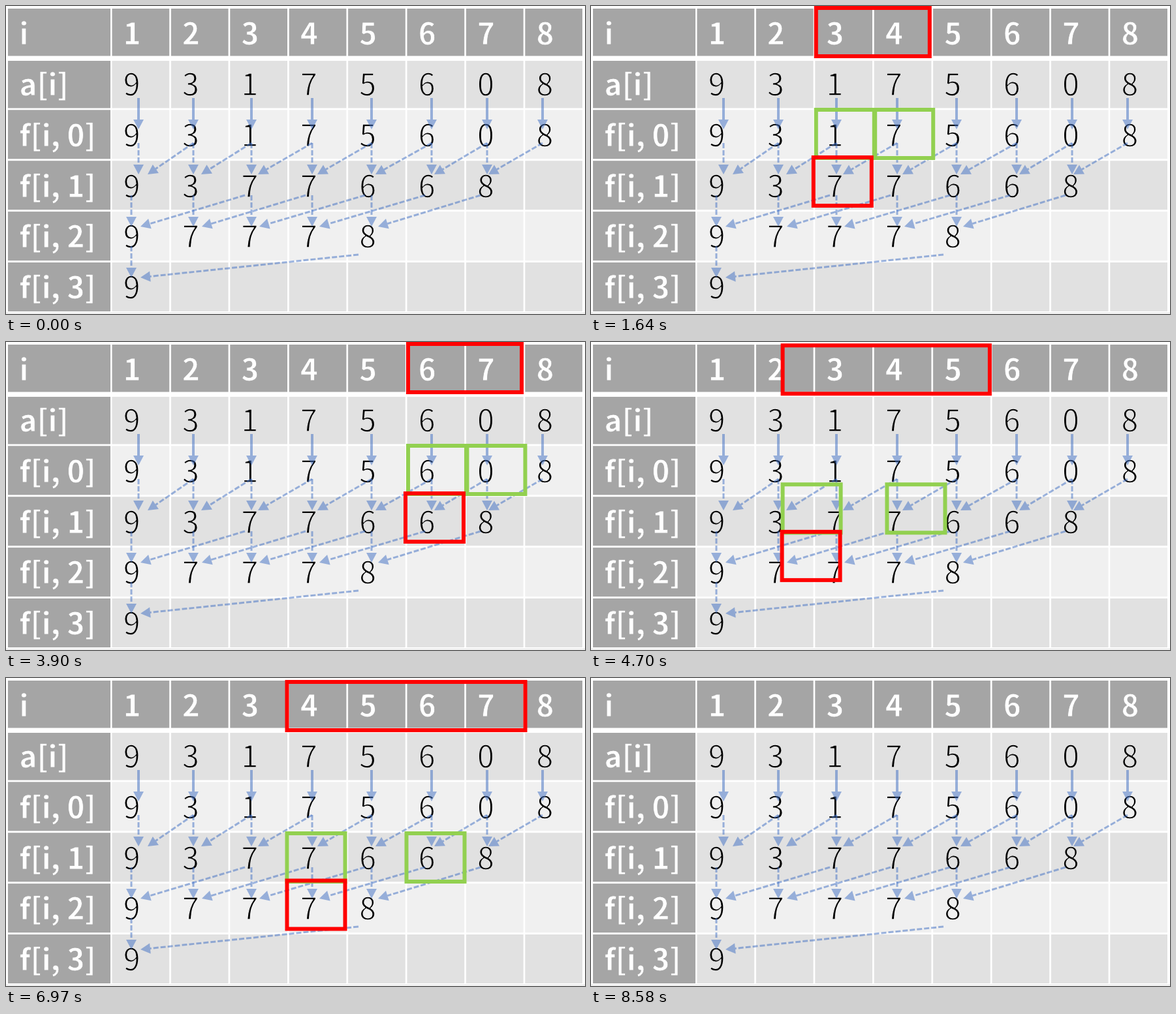
Recreate the animation shown at these times as an HTML page with a canvas. Size 887 by 472 pixels, loop 8680 ms.

```html
<!DOCTYPE html>
<html lang="en">
<head>
<meta charset="utf-8">
<title>Sparse table</title>
<style>
html, body { margin: 0; width: 100%; height: 100%; overflow: hidden; background: #fff; }
canvas { display: block; }
</style>
</head>
<body>
<canvas id="stage" width="887" height="472"></canvas>
<script>
const ctx = document.getElementById('stage').getContext('2d');
const LOOP = 8680;
const FAMILY = '"Noto Sans CJK SC", "Noto Sans CJK", "Noto Sans", sans-serif';
const COL = 90.4;
const GREY = '#a5a5a5', RED = '#f00', GREEN = '#92d050';

const input = [9, 3, 1, 7, 5, 6, 0, 8];
const anchors = [203, 287, 376, 469, 560, 652, 737, 822];

// Each level joins two neighbours that lie `span` apart
const levels = [
  { span: 1, x: 164, pitch: 90.4, width: 174, top: 3, inset: 4, first: 203, tail: 210, side: 210, tip: 258 },
  { span: 2, x: 156, pitch: 91.5, width: 365, top: 6, inset: 0, first: 192, tail: 290, side: 290, tip: 338 },
  { span: 4, x: 157, pitch: 91, width: 729, top: 3, inset: 0, first: 192, tail: 368, side: 381, tip: 416 }
];

function joinPairs(list, span) {
  return list.slice(span).map((v, i) => Math.max(v, list[i]));
}

// The table keeps f[i, 3] only, so the last level has one value
const results = [input];
levels.forEach((l, n) => results.push(joinPairs(results[n], l.span)));

const rows = [
  { label: 'i', values: input.map((v, i) => i + 1) },
  { label: 'a[i]', values: input },
  ...results.map((values, n) => ({ label: `f[i, ${n}]`, values }))
];

function write(g, text, x, y, color, back, thin) {
  g.fillStyle = color;
  g.fillText(text, x, y);
  g.strokeStyle = back;
  g.lineWidth = thin;
  g.strokeText(text, x, y);
}

function drawRow(g, row, r) {
  const top = r ? 3.5 + 77.9 * r + (r === 1 ? 2.6 : 0) : 4;
  const height = r > 1 ? 75 : 72.5;
  const base = r ? 59.5 + 77.7 * r : 59;
  const back = !r ? GREY : r % 2 ? '#e1e1e1' : '#f0f0f0';

  g.fillStyle = GREY;
  g.fillRect(3, top, 157, height);
  g.fillStyle = back;
  for (let c = 0; c < 8; c++) g.fillRect(162.5 + c * COL, top, 87.7, height);

  g.font = 'bold 45.5px ' + FAMILY;
  write(g, row.label, 20.5, base, '#fff', GREY, 0.8);
  if (r) g.font = '300 46.5px ' + FAMILY;
  row.values.forEach((v, c) => {
    write(g, v, 179.7 + c * COL, base, r ? '#000' : '#fff', back, r ? 1.3 : 0.8);
  });
}

function arrow(g, x1, y1, x2, y2, width, dash) {
  const neck = Math.hypot(x2 - x1, y2 - y1) - 15;
  g.save();
  g.translate(x1, y1);
  g.rotate(Math.atan2(y2 - y1, x2 - x1));
  g.strokeStyle = g.fillStyle = 'rgba(68, 114, 196, 0.52)';
  g.lineWidth = width;
  g.setLineDash(dash);
  g.beginPath();
  g.moveTo(0, 0);
  g.lineTo(neck, 0);
  g.stroke();
  g.beginPath();
  g.moveTo(neck + 15, 0);
  g.lineTo(neck, -8);
  g.lineTo(neck, 8);
  g.fill();
  g.restore();
}

function drawArrows(g, level, n) {
  const { span, first, tail, side, tip } = level;
  results[n + 1].forEach((v, c) => {
    const x = c ? anchors[c] : first;
    const reach = 14 - 2 * c / span;
    arrow(g, x, tail, x, tip, 3, [8, 3]);
    arrow(g, anchors[c + span] - 10 * n, side, x + reach, tip, 3, [8, 3]);
  });
}

function makeTable() {
  const layer = document.createElement('canvas');
  layer.width = 887;
  layer.height = 472;
  const g = layer.getContext('2d');
  g.lineJoin = 'round';
  g.fillStyle = '#fff';
  g.fillRect(0, 0, 887, 472);
  g.fillStyle = '#dcdcdc';
  g.fillRect(0, 470, 887, 1);
  rows.forEach((row, r) => drawRow(g, row, r));
  anchors.forEach(x => arrow(g, x, 141, x, 189, 4, []));
  levels.forEach((level, n) => drawArrows(g, level, n));
  return layer;
}

// Markers for one result cell: the covered range, both operands, the result
function poseOf(n, c) {
  const { span, x, pitch, width, top, inset } = levels[n];
  const left = x + pitch * c;
  const y = 159 + 79 * n;
  return {
    range: [left, top, width],
    a: [left, y, 89],
    b: [left + pitch * span, y, 89],
    result: [left - inset, 232 + 78.5 * n, 89]
  };
}

const stops = results.slice(1).flatMap((list, n) => list.map((v, c) => ({ n, pose: poseOf(n, c) })));
const glide = [0.19, 0.65, 0.89, 1];
const sweep = [0, 0.75, 0.96, 1];
const startOf = i => Math.max(720, 586 + 664 * i);

function mix(from, to, p) {
  const pose = {};
  for (const part in from) pose[part] = from[part].map((v, k) => v + (to[part][k] - v) * p);
  return pose;
}

function poseAt(t) {
  let i = 0;
  while (i < stops.length - 2 && t >= startOf(i + 1)) i++;
  if (t < startOf(0)) return stops[0].pose;
  const step = Math.min(3, Math.floor((t - startOf(i)) / 126.6));
  const from = stops[i], to = stops[i + 1];
  const ease = from.n === to.n ? glide : sweep;
  return mix(from.pose, to.pose, ease[step]);
}

function opacityAt(t) {
  if (t < 210 || t >= 8580) return 0;
  return t < 310 || t >= 8480 ? 0.5 : 1;
}

function box([x, y, w], color) {
  ctx.strokeStyle = color;
  ctx.strokeRect(x, y, w, 74);
}

const table = makeTable();

function draw(t) {
  ctx.globalAlpha = 1;
  ctx.drawImage(table, 0, 0);
  ctx.globalAlpha = opacityAt(t);
  if (!ctx.globalAlpha) return;
  const { range, a, b, result } = poseAt(t);
  ctx.lineWidth = 6;
  box(a, GREEN);
  box(b, GREEN);
  box(result, RED);
  box(range, RED);
}

const begin = performance.now();
function tick() {
  draw((performance.now() - begin) % LOOP);
  requestAnimationFrame(tick);
}
tick();
</script>
</body>
</html>
```
